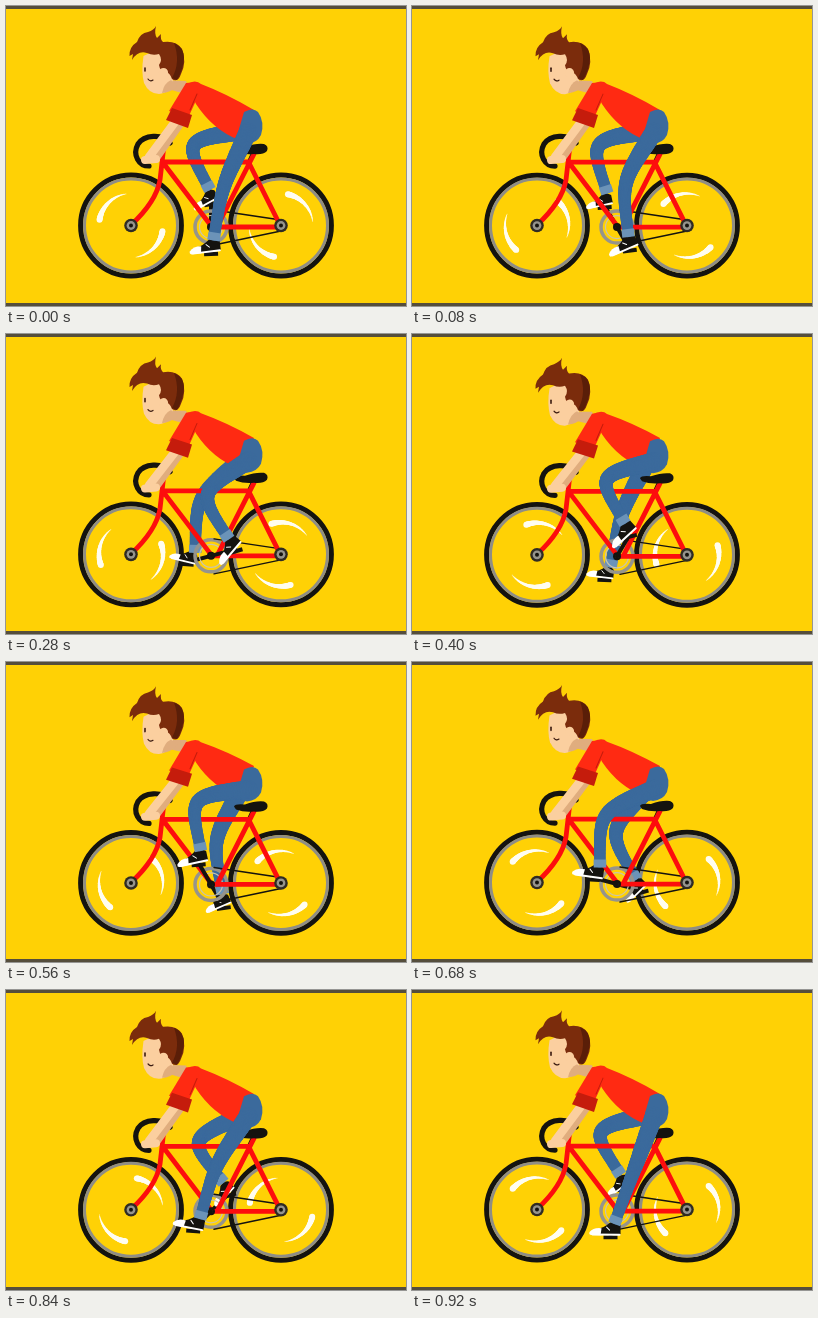
Animation, 400 px wide and 300 px high, one loop 960 ms. Source, as an HTML page with a canvas:

```html
<!DOCTYPE html>
<html lang="en">
<head>
<meta charset="utf-8">
<title>Cyclist</title>
<style>
html, body { margin: 0; width: 100%; height: 100%; overflow: hidden; background: #ffd105; }
canvas { display: block; }
</style>
</head>
<body>
<canvas id="stage" width="400" height="300"></canvas>
<script>
const ctx = document.getElementById('stage').getContext('2d');
const LOOP = 960, STEP = 40, TAU = Math.PI * 2, DEG = Math.PI / 180;
const BLACK = '#14130f', RED = '#fd0d0d', SHIRT = '#ff2a12', CUFF = '#c51c0c';
const JEANS = '#3b6a9c', SKIN = '#fbcf9f', SHADE = '#e0ad7e', GREY = '#96948c';
const CRANK = { x: 205, y: 221, r: 25 };
const THIGH = 59, SHIN = 52;

ctx.lineCap = ctx.lineJoin = 'round';

function fill(d, color) {
  ctx.fillStyle = color;
  ctx.fill(new Path2D(d));
}

function stroke(d, color, width) {
  ctx.strokeStyle = color;
  ctx.lineWidth = width;
  ctx.stroke(new Path2D(d));
}

function disc(x, y, r, color) {
  ctx.fillStyle = color;
  ctx.beginPath();
  ctx.arc(x, y, r, 0, TAU);
  ctx.fill();
}

function ring(x, y, r, color, width) {
  ctx.strokeStyle = color;
  ctx.lineWidth = width;
  ctx.beginPath();
  ctx.arc(x, y, r, 0, TAU);
  ctx.stroke();
}

function at(x, y, angle, draw, scale = 1) {
  ctx.save();
  ctx.translate(x, y);
  ctx.rotate(angle);
  ctx.scale(scale, scale);
  draw();
  ctx.restore();
}

// Two tapered glints, thick at the leading end
function wheel(x, y, glint) {
  ring(x, y, 50.4, BLACK, 5);
  ring(x, y, 46.5, '#8f8d85', 3);
  for (const side of [0, 180]) {
    for (let u = 0; u <= 1; u += 0.02) {
      const a = (glint + side - 37 + 72 * u) * DEG;
      disc(x + 32 * Math.cos(a), y - 32 * Math.sin(a), 0.4 + 2.6 * u, '#fffdf0');
    }
  }
}

function hub(x, y) {
  disc(x, y, 6.8, '#2f2b24');
  disc(x, y, 4.4, GREY);
  disc(x, y, 2, BLACK);
}

function shoe() {
  fill('M10 -1 L10 -10 Q6 -14 0 -13 Q-7 -7 -14 -6 L-14 -1 Z', BLACK);
  fill('M-9 -7 Q-17 -8 -21 -3 Q-22 0 -19 0 L-10 0 Z', '#fff');
  stroke('M-18 -.6 L9 -.6', '#fff', 2);
  stroke('M-4 -8 L-1 -5', '#fff', 1);
}

// Angle runs from the bottom of the stroke, counter-clockwise on screen
function leg(hip, angle, lift, shoeSize) {
  const px = CRANK.x + CRANK.r * Math.sin(angle);
  const py = CRANK.y + lift + CRANK.r * Math.cos(angle);
  const tilt = -(18 + 32 * Math.cos(angle - 110 * DEG)) * DEG;
  const c = Math.cos(tilt), s = Math.sin(tilt);
  const ankle = { x: px + 5 * c + 15 * s, y: py + 5 * s - 15 * c };

  // Knee from the two bone lengths, always bending forward
  const dx = ankle.x - hip.x, dy = ankle.y - hip.y, d = Math.hypot(dx, dy);
  const along = (THIGH ** 2 - SHIN ** 2 + d * d) / (2 * d);
  const bend = Math.sqrt(Math.max(0, THIGH ** 2 - along ** 2));
  const knee = {
    x: hip.x + (along * dx - bend * dy) / d,
    y: hip.y + (along * dy + bend * dx) / d
  };
  const curve = (axis, u) => {
    const a = hip[axis], b = ankle[axis], k = knee[axis], v = 1 - u;
    return v ** 3 * a + 3 * v * u * k + u ** 3 * b;
  };

  stroke(`M${CRANK.x} ${CRANK.y + lift} L${px} ${py}`, BLACK, 4);
  at(px, py, tilt / 3, () => fill('M-7 0 H7 V4 H-7 Z', BLACK));
  at(px, py, tilt, shoe, shoeSize);
  for (let u = 0; u <= 1; u += 0.01) {
    disc(curve('x', u), curve('y', u), 5.7 + 3.6 * (1 - u) ** 1.5, JEANS);
  }
  const aim = Math.atan2(ankle.y - curve('y', 0.92), ankle.x - curve('x', 0.92));
  at(ankle.x, ankle.y, aim, () => fill('M-4 -6.3 H4 V6.3 H-4 Z', '#6b93b8'));
}

function frame() {
  ring(CRANK.x, CRANK.y, 16, GREY, 3.5);
  ring(CRANK.x, CRANK.y, 11.5, '#c9c3ad', 1.2);
  stroke('M208 204 L275 214 M208 239 L275 225', BLACK, 1.4);
  stroke('M248 145 L242 158', BLACK, 4);
  stroke('M158 139 L154 174 Q150 196 125 219 M157 156 H244 M158 158 L206 221 H275 L243 157 M248 148 L211 221', RED, 4.8);
  hub(125, 219.5);
  hub(275, 219.5);
  disc(CRANK.x, CRANK.y, 4, BLACK);
  disc(CRANK.x, CRANK.y, 1.5, GREY);
  fill('M228 143 Q229 140 239 141 Q250 137 258 138 Q263 140 261 145 Q257 149 248 148 Q238 149 230 146 Z', BLACK);
  stroke('M164 137 C156 127 138 129 132 138 C126 149 133 160 143 160', BLACK, 5.2);
}

function head() {
  fill('M160 74 L180 75 L184 84 L176 87 L162 83 Z', SHADE);
  fill('M137.5 50 Q135 66 138 77 Q143 88 153 88 Q164 87 167 74 L169 54 L150 44 Z', SKIN);
  fill('M156 87 Q158 77 165 74 L172 80 Q164 87 156 87 Z', SHADE);
  fill('M126 54 L127 48 L123.5 50 Q123 41 131 36 Q134 27 142 26 Q148 24 150 20 Q148 28 151 32 L155 28 Q154 33 157 36 Q170 34 176 43 Q181 56 175 68 Q172 77 166 73 Q164 67 160 66 Q154 66 153 59 Q157 54 153 48 Q147 50 141 47 Q132 44 126 54 Z', '#7b2c0c');
  fill('M168 37 Q178 41 178 52 Q177 64 171 74 L166 72 Q175 56 168 37 Z', '#5a1e08');
  disc(157.5, 66.5, 4.6, SKIN);
  stroke('M139 62 V65', '#3a1a10', 1.6);
  stroke('M142 73 Q144 76 147 74', '#3a1a10', 1.2);
}

function torso() {
  fill('M180 78 Q190 73 195 78 Q221 88 248 104 Q243 121 233 134 Q207 124 190 98 Z', SHIRT);
}

function sleeve() {
  fill('M180 77 Q191 75 193 88 L182 112 L163 105 Z', SHIRT);
  stroke('M191 88 L184 104', CUFF, 1);
  fill('M166 102 L186 109 L182 122 L160 114 Z', CUFF);
}

function draw(t) {
  const phase = t / LOOP * TAU;
  const sway = (1 - Math.cos(phase - 0.15)) / 2;
  const lift = 1.5 * sway, lean = -0.043 * sway;
  const leaning = part => {
    ctx.save();
    ctx.transform(1, lean, 0, 1, 0, -250 * lean);
    part();
    ctx.restore();
  };

  ctx.fillStyle = '#ffd105';
  ctx.fillRect(0, 0, 400, 300);
  ctx.fillStyle = '#554e3c';
  ctx.fillRect(0, 0, 400, 3);
  ctx.fillRect(0, 297, 400, 3);

  wheel(125, 219.5 + lift, 136 + t * 0.75);
  wheel(275, 219.5 + lift, 44 + t * 0.75);
  leg({ x: 236, y: 125 + lift }, phase + Math.PI, lift, 0.87);
  at(0, lift, 0, frame);

  const elbow = 116 - 75 * lean, hand = 153 + lift / 2;
  stroke(`M176 ${elbow} L150 ${hand}`, SHADE, 7);
  leaning(() => { head(); torso(); });
  stroke(`M169 ${elbow} L143 ${hand - 2}`, SKIN, 8.5);
  stroke(`M150 ${hand} L139 ${hand + 1}`, SKIN, 8);
  leaning(sleeve);
  at(0, lift, 0, () => fill('M238 106 Q247 101 252 106 Q259 116 255 129 Q251 137 241 138 Q232 137 233 123 Z', JEANS));
  leg({ x: 242, y: 126 + lift }, phase, lift, 1);
}

function tick(now) {
  draw(Math.floor(now % LOOP / STEP) * STEP);
  requestAnimationFrame(tick);
}
tick(performance.now());
</script>
</body>
</html>
```
